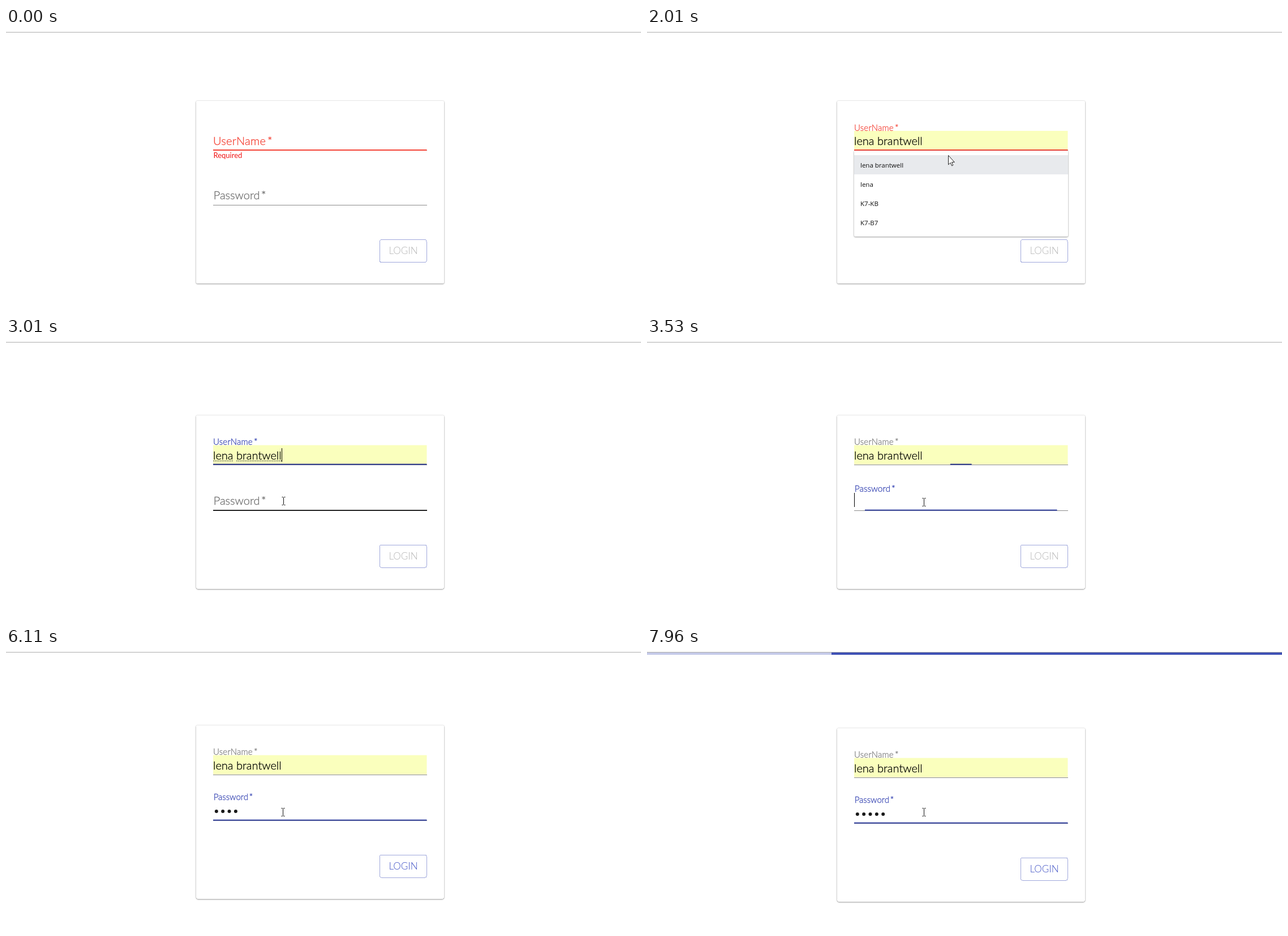
Animation, 1122 px wide and 499 px high, one loop 8000 ms. Source, as an HTML page:

```html
<!DOCTYPE html>
<html lang="en">
<head>
<meta charset="utf-8">
<title>Login form</title>
<style>
  html, body { margin: 0; width: 100%; height: 100%; overflow: hidden; background: #fff; }
  svg { display: block; width: 1122px; height: 499px; }
  text { font: 300 20px Lato, sans-serif; white-space: pre; }
  .crisp { shape-rendering: crispEdges; }
  .raised { fill: #fff; filter: drop-shadow(0 1px 1px rgba(0,0,0,.32)) drop-shadow(0 0 1px rgba(0,0,0,.18)); }
  .line { fill: #8c8c8c; }
  .label { word-spacing: -3px; stroke-width: .35px; }
  #userLabel { letter-spacing: .3px; }
  #userValue { fill: #000; stroke: #000; stroke-width: .3px; }
  #required { font-size: 13px; font-weight: 400; fill: #f01414; }
  #login text { font-size: 17px; text-anchor: middle; }
  #menu text { font: 400 11.5px "Open Sans", sans-serif; fill: #111; }
</style>
</head>
<body>
<svg viewBox="0 0 1122 499">
  <rect class="crisp" y="7" width="1122" height="1" fill="#acacac"/>
  <g id="bar" class="crisp">
    <rect y="8" width="1122" height="4" fill="#c5cae9"/>
    <rect id="fill" y="8" height="4" fill="#3f51b5"/>
  </g>

  <g id="card">
    <rect id="paper" class="raised crisp" x="336" width="438" rx="3"/>
    <rect id="autofill" x="366" y="53" width="377.5" height="34" fill="#faffbd"/>
    <text id="userLabel" class="label">UserName *</text>
    <text id="userValue" x="366" y="78"><tspan>lena</tspan> <tspan>brantwell</tspan></text>
    <path id="composing" class="crisp" stroke="#444" stroke-dasharray="2 1"/>
    <rect id="userCaret" class="crisp" y="58" width="1" height="24"/>
    <rect class="line crisp" x="366" y="87" width="377.5" height="1"/>
    <rect id="userRipple" y="86" height="2"/>
    <text id="required" x="366.5" y="101">Required</text>

    <g id="lower">
      <text id="passLabel" class="label">Password *</text>
      <g id="dots" fill="#1a1a1a"></g>
      <rect id="passCaret" class="crisp" y="137" width="1" height="25"/>
      <rect id="passLine" class="line crisp" x="366" width="377.5"/>
      <rect id="passRipple" y="167" height="2" fill="#303f9f"/>
      <g id="login">
        <rect class="crisp" x="660.5" y="229.5" width="82.5" height="40" rx="3" fill="none" stroke="#a0a8dc"/>
        <text x="702" y="255">LOGIN</text>
      </g>
    </g>
  </g>

  <g id="menu">
    <rect class="raised" x="366" y="217" width="378" height="152" rx="2"/>
    <rect id="row" class="crisp" x="366" y="225" width="378" height="34" fill="#e8eaed"/>
  </g>

  <circle id="press" r="11.5" fill="#ff0" fill-opacity=".47"/>
  <g id="pointer">
    <path id="arrow" d="M.5 .5V16.8L4.2 13.4 6.6 18.8 8.8 17.8 6.5 12.4H11.3Z" fill="#fff" stroke="#222"/>
    <path id="beam" d="M-2.5-6.5h2l1 1 1-1h2M.5-5.5v12M-2.5 7.5h2l1-1 1 1h2" fill="none" stroke="#111"/>
  </g>
</svg>
<script>
const LOOP = 8000, LEFT = 366, WIDTH = 377.5;
const NS = 'http://www.w3.org/2000/svg';
const el = Object.fromEntries([...document.querySelectorAll('[id]')].map(e => [e.id, e]));

const set = (node, attrs) => { for (const k in attrs) node.setAttribute(k, attrs[k]); return node; };
const show = (node, on) => { node.style.display = on ? '' : 'none'; };
const add = (parent, tag, attrs) => parent.appendChild(set(document.createElementNS(NS, tag), attrs));
const mix = (a, b, p) => a + (b - a) * p;
const clamp = p => Math.min(1, Math.max(0, p));

['lena brantwell', 'lena', 'K7-KB', 'K7-B7'].forEach((name, i) => {
  add(el.menu, 'text', { x: 377, y: 247 + 34 * i }).textContent = name;
});
const dots = [0, 1, 2, 3, 4].map(i => add(el.dots, 'circle', { cx: 371.8 + 11.35 * i, cy: 152.4, r: 3 }));

// Dashed underline below each word of the user name.
set(el.composing, {
  d: [...el.userValue.children].map(word => {
    const from = word.getStartPositionOfChar(0).x;
    return `M${from} 80.8H${from + word.getComputedTextLength()}`;
  }).join('')
});

function bezier([x1, y1, x2, y2], x) {
  const at = (a, b, u) => 3 * a * u * (1 - u) ** 2 + 3 * b * u * u * (1 - u) + u ** 3;
  let lo = 0, hi = 1;
  for (let i = 0; i < 24; i++) {
    const mid = (lo + hi) / 2;
    if (at(x1, x2, mid) < x) lo = mid; else hi = mid;
  }
  return at(y1, y2, lo);
}
const swift = p => bezier([.25, .8, .25, 1], clamp(p));

// Keys are [time, ...values]; an optional curve array ends a key.
function track(keys, t) {
  let i = 0;
  while (i < keys.length - 2 && t >= keys[i + 1][0]) i++;
  const a = keys[i], b = keys[i + 1];
  let p = clamp((t - a[0]) / (b[0] - a[0]));
  const curve = a[a.length - 1];
  if (Array.isArray(curve)) p = bezier(curve, p);
  return a.slice(1).filter(v => !Array.isArray(v)).map((v, k) => mix(v, b[k + 1], p));
}

// The screen refreshes in coarse steps while something moves.
const BURSTS = [[190, 360, 50], [1020, 1170, 50], [1820, 2060, 50], [2290, 3080, 50], [3340, 3630, 50], [7320, 7960, 53.3]];
function hold(t) {
  for (const [start, end, step] of BURSTS)
    if (t >= start && t < end) return Math.max(start, end - step * Math.ceil((end - t) / step));
  return t;
}

const PATH = [[190, 859, 418], [360, 554, 208], [649.9, 554, 208], [650, 553, 208], [1780, 553, 208],
  [2010, 532, 225], [2060, 527, 228], [2600, 527, 228], [2990, 489, 290]];
const PRESSES = [[860, 1020], [1340, 1490], [2290, 2380], [3340, 3430]];
const KEYS = [3990, 4370, 5350, 5580, 6160];
const FOCUS_PASS = 3425, CHOSEN = 2390, SUBMIT = 7320;

const SLIDE = [[0, 0, [.15, 0, .515, .41]], [.25, .3765, [.31, .284, .8, .734]],
  [.4835, .8439, [.4, .627, .6, .902]], [1, 1.6028]];
const STRETCH = [[0, .08, [.205, .057, .577, .454]], [.1915, .4571, [.152, .196, .648, 1.004]],
  [.4415, .728, [.258, -.003, .212, 1.382]], [1, .08]];

function placeLabel(label, x, rest, floated, p, color) {
  set(label, {
    transform: `translate(${x} ${mix(rest, floated, p)}) scale(${mix(1, .75, p)})`,
    fill: color, stroke: color
  });
}
function placeRipple(ripple, p) {
  set(ripple, { x: LEFT + WIDTH * (1 - p) / 2, width: WIDTH * p });
}

function drawPointer(t, top, menuOpen) {
  const [x, y] = track(PATH, t);
  const inside = (from, to) => x > LEFT && x < LEFT + WIDTH && y > top + from && y < top + to;
  const lower = t < CHOSEN ? 16 : 0;
  const onPass = !menuOpen && inside(130 + lower, 168 + lower);
  const beam = onPass || inside(40, 88);
  show(el.pointer, t >= 190);
  show(el.beam, beam);
  show(el.arrow, !beam);
  set(el.pointer, { transform: `translate(${Math.round(x)} ${Math.round(y)})` });
  set(el.press, { cx: Math.round(x) - 2, cy: Math.round(y) - .5 });
  show(el.press, PRESSES.some(([from, to]) => t >= from && t < to));
  return { y, onPass: onPass && t >= 190 };
}

function drawUser(t, preview) {
  const error = t < CHOSEN, focused = t >= 1020 && t < FOCUS_PASS;
  const filled = preview || t >= 2290;
  placeLabel(el.userLabel, LEFT, 78, 52.5, swift((t - 990) / 180),
    error ? '#f44336' : focused ? '#303fb0' : '#7a7a7a');
  show(el.required, error);
  show(el.autofill, filled);
  show(el.userValue, filled);
  show(el.composing, !error && focused);
  set(el.userRipple, { fill: error ? '#f44336' : '#28348c' });
  placeRipple(el.userRipple, 1 - swift((t - FOCUS_PASS) / 245));
  show(el.userCaret, focused && (!filled || (t >= CHOSEN && t < 3080)));
  set(el.userCaret, { x: filled ? LEFT + Math.round(el.userValue.getComputedTextLength()) : LEFT });
}

function drawPassword(t, hovered) {
  const focused = t >= FOCUS_PASS;
  const typed = KEYS.filter(k => t >= k).length;
  const p = swift((t - FOCUS_PASS) / 245);
  placeLabel(el.passLabel, LEFT + .7, 158, 132.5, p, focused ? '#303fb0' : '#707070');
  placeRipple(el.passRipple, p);
  const thick = hovered && !focused;
  set(el.passLine, { y: thick ? 167 : 168, height: thick ? 2 : 1 });
  el.passLine.style.fill = thick ? '#222' : '';
  dots.forEach((dot, i) => show(dot, i < typed));
  const since = t - (typed ? KEYS[typed - 1] : 3480);
  show(el.passCaret, focused && Math.floor(Math.max(0, since) / 510) % 2 === 0);
  set(el.passCaret, { x: Math.round(LEFT + 11.4 * typed) });
  set(el.login.lastElementChild, { fill: typed ? '#3f51c5' : '#b4b4b4' });
}

function drawBar(t) {
  show(el.bar, t >= SUBMIT);
  const phase = clamp((t - SUBMIT) / 1524);
  const [slide] = track(SLIDE, phase), [scale] = track(STRETCH, phase);
  const left = slide - .0489 - scale / 2;
  set(el.fill, { x: 1122 * left, width: 1122 * scale });
}

function draw(time) {
  const t = hold(time);
  const error = t < CHOSEN;
  const top = error ? 129 : t < SUBMIT ? 136.6 : 141.6;
  const menuOpen = t >= 1120 && t < 2340;
  set(el.card, { transform: `translate(0 ${top})` });
  set(el.paper, { height: error ? 323 : 307 });
  set(el.lower, { transform: `translate(0 ${error ? 16 : 0})` });
  const pointer = drawPointer(t, top, menuOpen);
  const picked = menuOpen && pointer.y >= 223;
  show(el.menu, menuOpen);
  show(el.row, picked);
  drawUser(t, picked);
  drawPassword(t, pointer.onPass);
  drawBar(t);
}

const began = performance.now();
function tick() {
  draw((performance.now() - began) % LOOP);
  requestAnimationFrame(tick);
}
tick();
</script>
</body>
</html>
```
